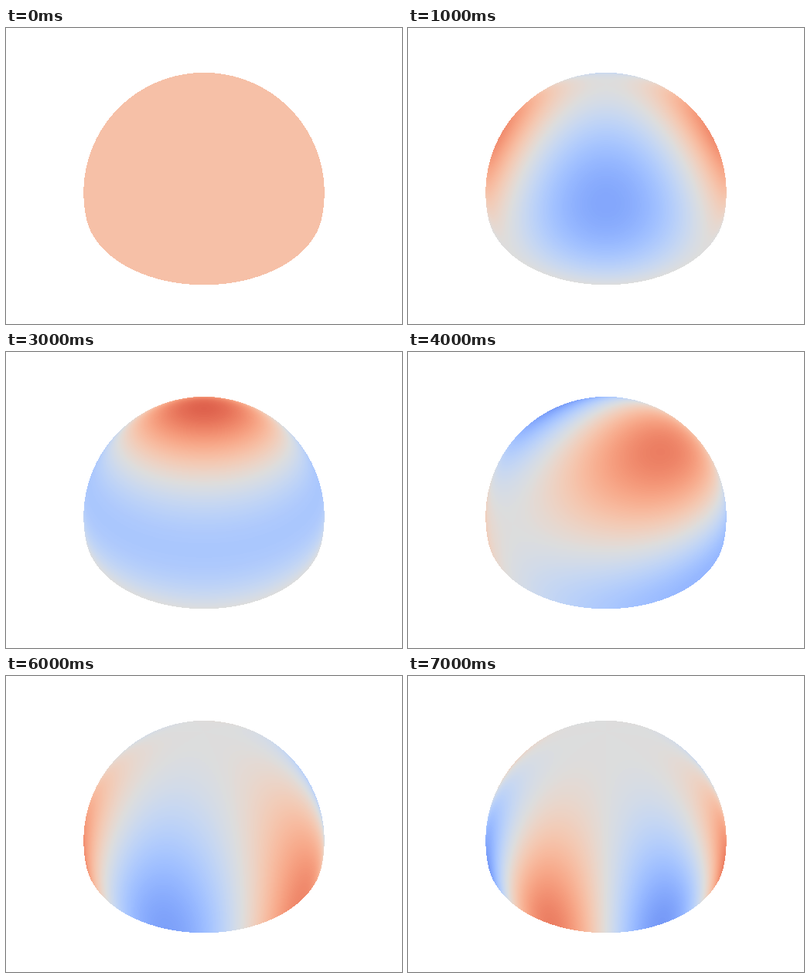
Recreate the animation shown at these times as an HTML page with a canvas. Size 512x384 px, loop 8 s.

```html
<!DOCTYPE html>
<html lang="en">
<head>
<meta charset="utf-8">
<title>Spherical harmonics on a dome</title>
<style>
  html, body { margin: 0; width: 100%; height: 100%; overflow: hidden; background: #fff; }
  canvas { display: block; }
</style>
</head>
<body>
<canvas id="stage" width="512" height="384"></canvas>
<script>
const ctx = document.getElementById('stage').getContext('2d');
const W = 512, H = 384, STEP = 1000;
const CENTER = { x: 256, y: 213.6 }, RADIUS = 155.7;
const DISTANCE = 3.66, ELEVATION = 39 * Math.PI / 180;
const { PI, sqrt, sin, cos } = Math;

// Real spherical harmonics in Cartesian form on the unit sphere.
const harmonics = [
  () => sqrt(1 / PI) / 2,
  (x, y, z) => sqrt(105 / PI) / 2 * x * y * z,
  (x, y, z) => sqrt(21 / (2 * PI)) / 4 * y * (5 * z * z - 1),
  (x, y, z) => sqrt(7 / PI) / 4 * z * (5 * z * z - 3),
  (x, y, z) => sqrt(21 / (2 * PI)) / 4 * x * (5 * z * z - 1),
  (x, y, z) => sqrt(105 / PI) / 4 * (x * x - y * y) * z,
  (x, y) => sqrt(35 / (2 * PI)) / 4 * x * (x * x - 3 * y * y),
  (x, y) => sqrt(35 / PI) * 3 / 4 * x * y * (x * x - y * y)
];

// Diverging cool-warm map, interpolated in polar CIELAB; v runs from -1 to 1.
function coolWarm(v) {
  const a = Math.abs(v);
  const m = 88 - 8 * a, s = 1.08 * a;
  const hue = v < 0 ? -1.661 + 0.561 * a : 1.061 - 0.561 * a;
  const fy = (m * cos(s) + 16) / 116;
  const fx = fy + m * sin(s) * cos(hue) / 500;
  const fz = fy - m * sin(s) * sin(hue) / 200;
  const expand = f => f > 6 / 29 ? f ** 3 : (f - 4 / 29) * 108 / 841;
  const X = 0.95047 * expand(fx), Y = expand(fy), Z = 1.08883 * expand(fz);
  return [
    3.2406 * X - 1.5372 * Y - 0.4986 * Z,
    -0.9689 * X + 1.8758 * Y + 0.0415 * Z,
    0.0557 * X - 0.204 * Y + 1.057 * Z
  ].map(c => {
    c = Math.min(1, Math.max(0, c));
    return Math.round(255 * (c > 0.0031308 ? 1.055 * c ** (1 / 2.4) - 0.055 : 12.92 * c));
  });
}

const palette = Array.from({ length: 256 }, (_, i) => coolWarm(i / 127.5 - 1));

// Cast a perspective ray through a pixel; returns the dome point or null.
function domePoint(px, py) {
  const sx = (px + 0.5 - CENTER.x) / RADIUS;
  const sy = (CENTER.y - py - 0.5) / RADIUS;
  const s2 = sx * sx + sy * sy;
  if (s2 > 1) return null;
  const focal = sqrt(DISTANCE ** 2 - 1);
  const t = focal * (DISTANCE - sqrt(1 - s2)) / (s2 + focal * focal);
  const right = t * sx, up = t * sy, toward = DISTANCE - t * focal;
  const z = up * cos(ELEVATION) + toward * sin(ELEVATION);
  if (z < 0) return null;
  const front = toward * cos(ELEVATION) - up * sin(ELEVATION);
  // The camera stands at azimuth -45 degrees.
  return [(right + front) / sqrt(2), (right - front) / sqrt(2), z];
}

const images = harmonics.map(() => {
  const image = ctx.createImageData(W, H);
  image.data.fill(255);
  return image;
});

for (let py = 0; py < H; py++) {
  for (let px = 0; px < W; px++) {
    const point = domePoint(px, py);
    if (!point) continue;
    harmonics.forEach((harmonic, i) => {
      const level = Math.round(127.5 * (harmonic(...point) + 1));
      images[i].data.set(palette[level], 4 * (py * W + px));
    });
  }
}

const start = performance.now();
let shown = -1;
function draw() {
  const index = Math.floor((performance.now() - start) / STEP) % images.length;
  if (index !== shown) ctx.putImageData(images[shown = index], 0, 0);
  requestAnimationFrame(draw);
}
draw();
</script>
</body>
</html>
```
